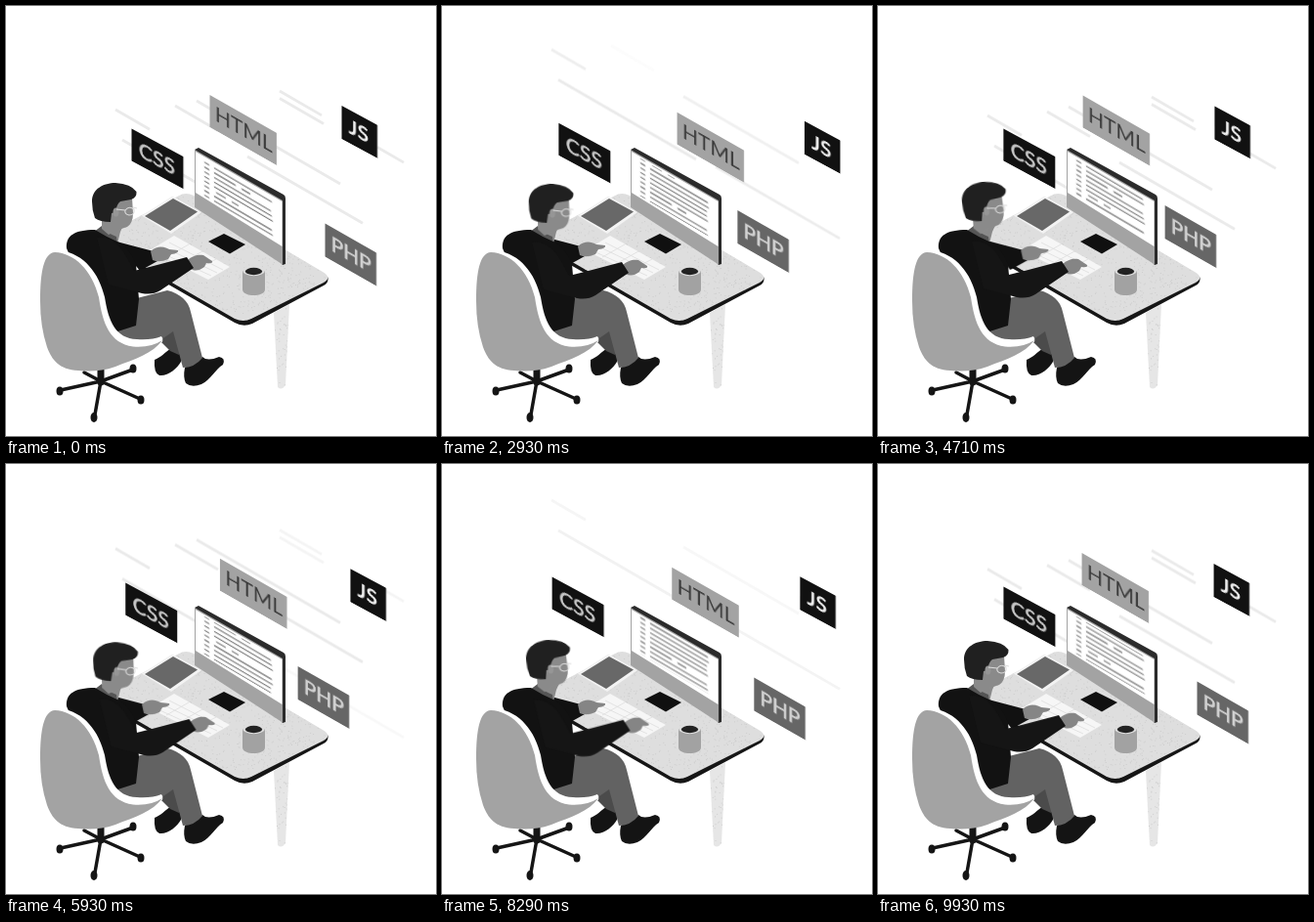
An HTML page for the animation above (10000 ms loop, 440 by 440 pixels).

```html
<!DOCTYPE html>
<html lang="en">
<head>
<meta charset="utf-8">
<title>Developer at a desk</title>
<style>
html, body { margin: 0; width: 100%; height: 100%; overflow: hidden; background: #fff; }
svg { display: block; width: 100vw; height: 100vh; }
text { font: 21px Lato, sans-serif; stroke-width: .6; }
.bold { font-weight: 700; }

/* sine ease between keyframes */
.sway { animation: 10s cubic-bezier(.37, 0, .63, 1) infinite; }
.css { animation-name: css; }
.html { animation-name: html; animation-duration: 5s; }
.js { animation-name: js; animation-duration: 5s; }
.php { animation-name: php; }
.head { animation-name: head; transform-origin: 107px 232px; }
.left { animation-name: left; animation-duration: 5s; }
.right { animation-name: right; }
#code { animation: code 5s linear infinite; }

@keyframes css {
  0%, 45%, 100% { transform: none; }
  15%, 79.5% { transform: translate(-17px, -10.7px); }
}
@keyframes html { 50% { transform: translate(34.5px, 19px); } }
@keyframes js { 50% { transform: translate(29.5px, 17px); } }
@keyframes php { 45% { transform: translate(-33px, -18.5px); } }
@keyframes head {
  0%, 100% { transform: none; }
  15%, 70% { transform: translate(0, 2.5px) rotate(6deg); }
  45%, 85% { transform: translate(0, -1px) rotate(-4deg); }
}
@keyframes left {
  0%, 100% { transform: translate(9px, 5px); }
  20%, 80% { transform: none; }
}
@keyframes right {
  0%, 100% { transform: translate(1px, -5px); }
  10%, 35% { transform: none; }
  47% { transform: translate(4px, -1px); }
  70% { transform: translate(3px, -1px); }
  90% { transform: translate(1px, 0); }
}
@keyframes code { to { transform: translateY(-48px); } }
</style>
</head>
<body>
<svg viewBox="0 0 440 440">
  <defs>
    <clipPath id="screen"><path d="M3 3H86V42H3Z"/></clipPath>
    <clipPath id="top"><path d="M113 231Q114 227 120 224L177 194Q184 190 192 194L324 272Q334 278 325 283L251 320Q243 324 234 320L116 252Q112 248 113 231Z"/></clipPath>
    <clipPath id="leg"><path d="M274 314L290 305 286 388Q282 394 278 390Z"/></clipPath>
  </defs>

  <g id="streaks" stroke="#eaeaea" stroke-width="2.8"></g>

  <g class="sway html"><g transform="matrix(1 .57 0 1 208.5 91)">
    <path fill="#a3a3a3" d="M0 0H68.500V33H0Z"/><text x="5.500" y="23.500" fill="#3a3a3a">HTML</text>
  </g></g>
  <g class="sway css"><g transform="matrix(1 .54 0 1 128.500 125.500)">
    <path fill="#111" d="M0 0H53V33H0Z"/><text x="7.500" y="24" fill="#c9c9c9" stroke="#c9c9c9">CSS</text>
  </g></g>
  <g class="sway js"><g transform="matrix(1 .54 0 1 343.500 102)">
    <path fill="#111" d="M0 0H36.500V34H0Z"/><text x="7" y="24" fill="#eee" class="bold">JS</text>
  </g></g>
  <g class="sway php"><g transform="matrix(1 .57 0 1 326.500 222.500)">
    <path fill="#666" d="M0 0H52.500V34H0Z"/><text x="6" y="24" fill="#d2d2d2" stroke="#d2d2d2">PHP</text>
  </g></g>

  <!-- desk -->
  <g clip-path="url(#leg)"><path fill="#e6e6e6" d="M270 300H295V395H270Z"/><g class="grain"></g></g>
  <path fill="#161616" d="M116 250L234 318Q243 323 252 319L325 281Q329 280 329.500 277V280Q329 284 325 286L252 325Q243 329 234 324L116 256Z"/>
  <g clip-path="url(#top)"><path fill="#dedede" d="M100 180H340V330H100Z"/><g class="grain"></g></g>

  <!-- things on the desk -->
  <path fill="#f3f3f3" d="M139 214.500L170 194.500 200 211 169 233Z"/>
  <path fill="#686868" d="M142 215L171 197 196 210.500 168 230Z"/>
  <path fill="#f6f6f6" d="M147 250L172 235 229 267 207 280Z"/>
  <path stroke="#dedede" stroke-width=".8" d="M153 250L210 276M160 246L216 273M167 242L222 270M164 257L187 244M178 264L201 251M192 271L215 259"/>
  <path fill="#101010" d="M207 241L223 233 245 244 229 253.500Z"/>
  <path fill="#a2a2a2" d="M242 271V290C242 298 265 298 265 290V271Z"/>
  <ellipse cx="253.500" cy="270.500" rx="11.500" ry="5.800" fill="#ddd"/>
  <ellipse cx="253.500" cy="271.500" rx="8.600" ry="3.700" fill="#222"/>

  <!-- monitor -->
  <path fill="#2b2b2b" d="M193 147L197 145 284 193Q286 194 286 197V264L283 265Z"/>
  <path fill="#a3a3a3" d="M193 147L283 199V264.500L193 206Z"/>
  <path fill="#fff" d="M194 149L282.500 200V246L194 191Z"/>
  <g transform="matrix(1 .59 0 1 195 148)" clip-path="url(#screen)"><g id="code" stroke="#777" stroke-width="1.300"></g></g>

  <!-- chair base -->
  <g stroke="#151515" stroke-width="3.500" stroke-linecap="round">
    <path stroke-width="7" d="M97 372V385"/>
    <path d="M97 384L56 393M97 384L130 372M97 384L91 418M97 384L137 402M97 384L80 375"/>
  </g>
  <g fill="#151515">
    <ellipse cx="55" cy="394" rx="3.500" ry="4.500"/><ellipse cx="130" cy="371" rx="3.500" ry="4.500"/>
    <ellipse cx="90" cy="421" rx="3.500" ry="5"/><ellipse cx="138" cy="403" rx="3.500" ry="4.500"/>
  </g>

  <!-- legs -->
  <path fill="#141414" d="M152 362C158 360 163 354 168 351L179 355V364C175 371 166 379 157 378Q151 376 152 362Z"/>
  <path fill="#4b4b4b" d="M140 330L174 318 180 352 177 357 168 353 160 345Z"/>
  <path fill="#141414" d="M183 370L201 359Q206 364 218 359Q225 360 222 367C214 372 210 382 200 387Q190 391 184 386Q181 380 183 370Z"/>
  <path fill="#626262" d="M130 300L165 291C178 294 187 302 189 313L201 360Q193 370 181 370L171 333 158 342 108 342V325Z"/>

  <!-- far arm -->
  <g class="sway left">
    <path fill="#111" d="M104 236L142 246 146 256 128 266Z"/>
    <path fill="#858585" d="M139 246C146 240 152 241 158 244L167 245Q168 248 160 249L157 254Q148 258 141 255Z"/>
  </g>

  <!-- torso and head -->
  <path fill="#8a8a8a" d="M98 220L123 218 117 231 114 243 100 236Z"/>
  <path fill="#555" d="M90 231L98 225Q104 233 113 236L114 244 104 242Z"/>
  <path fill="#121212" d="M62 248C61 235 70 229 91 229Q102 236 116 242Q126 248 133 264L136 300 133 327 108 335 85 300Z"/>
  <g class="sway head">
    <path fill="#8a8a8a" d="M98 214L110 198 129 196 130 212Q130 222 124 226L115 229 105 234 98 228Z"/>
    <path fill="#202020" d="M88 200C88 187 100 181 112 181Q128 182 133.500 190Q134 196 128 198L117 200Q113 203 112 211L108 212 107 221Q96 221 91 217Q88 209 88 200Z"/>
    <ellipse cx="112.500" cy="211" rx="3" ry="4.500" fill="#969696"/>
    <path fill="none" stroke="#ddd" stroke-width="1.100" d="M113 208L122 209M122 209Q126 204 131 208Q132 214 126 214Q121 213 122 209M130 206L134 207"/>
  </g>

  <!-- near arm -->
  <g class="sway right">
    <path fill="#858585" d="M184 266C190 260 196 259 201 260L210 266Q211 269 204 268L202 272Q194 278 188 274Z"/>
    <path fill="#151515" d="M92 242C110 240 119 254 130 276L146 272 184 262 191 273 157 296Q149 301 138 299L104 290Z"/>
  </g>

  <!-- chair shell -->
  <path fill="#fff" d="M43 255Q48 249 56 250C80 254 95 273 101 298C105 323 112 340 134 341Q149 342 159 338Q163 342 156 348L105 374 62 350Z"/>
  <path fill="#a3a3a3" d="M35 302C35 270 39 253 50 252C70 253 88 270 95 298C99 325 106 345 130 348.500Q148 350 160 342C150 356 132 361 112 369C98 374 86 374 74 373C54 372 47 362 42 349Q35 328 35 302Z"/>
</svg>
<script>
const NS = "http://www.w3.org/2000/svg";
const SLOPE = 0.578, DRIFT = 105, CYCLE = 5000;

function path(parent, d, attrs = {}) {
  const el = document.createElementNS(NS, "path");
  el.setAttribute("d", d);
  for (const k in attrs) el.setAttribute(k, attrs[k]);
  return parent.appendChild(el);
}

// x, y, length, fade-in end, fade-out end (ms)
const streaks = [
  [112, 106, 35, 0, 3800], [119, 137, 141, 0, 4000], [173, 102, 44, 0, 3100],
  [195, 97, 147, 0, 2100], [247, 154, 118, 0, 3700], [280, 87, 43, 0, 1500],
  [280, 94.500, 45, 0, 1500], [380, 144.500, 27, 0, 1500], [280, 226, 127, 2000, 3900]
];
for (const [x, y, len, rise, out] of streaks) {
  const el = path(document.querySelector("#streaks"), `M${x} ${y}l${len} ${len * SLOPE}`);
  const at = (ms, opacity, shift = 0) => ({
    offset: ms / CYCLE, opacity,
    transform: `translateY(${shift - DRIFT * ms / CYCLE}px)`
  });
  const start = rise ? 0 : 1;
  const frames = [at(0, start)];
  if (rise) frames.push(at(400, 0), at(rise, 1));
  frames.push(
    at(Math.max(out - 1100, rise, 300), 1), at(out, 0),
    at(4150, 0), at(4150, 0, DRIFT), at(4700, start, DRIFT), at(CYCLE, start, DRIFT)
  );
  el.animate(frames, { duration: CYCLE, iterations: Infinity });
}

// scrolling code: each block of ten lines has two broken ones
const code = document.querySelector("#code");
for (let i = 0; i < 20; i++) {
  const y = (2.4 + i * 4.8).toFixed(1), k = i % 10;
  const body = k === 2 ? `M18 ${y}h22M46 ${y}h9` : k === 6 ? `M20 ${y}h10M36 ${y}h7` : `M18 ${y}h${58 + k % 3}`;
  path(code, `M8 ${y}h5${body}`);
}

// speckled surface
let seed = 7;
const rand = () => (seed = seed * 16807 % 2147483647) / 2147483647;
document.querySelectorAll(".grain").forEach((g, i) => {
  const [x, y, w, h, n] = i ? [110, 185, 225, 145, 1500] : [272, 305, 20, 90, 80];
  let d = "";
  while (d.length < n * 14) d += `M${(x + rand() * w).toFixed(1)} ${(y + rand() * h).toFixed(1)}h1`;
  path(g, d, { stroke: "#cbcbcb", "stroke-width": 0.9 });
});
</script>
</body>
</html>
```
